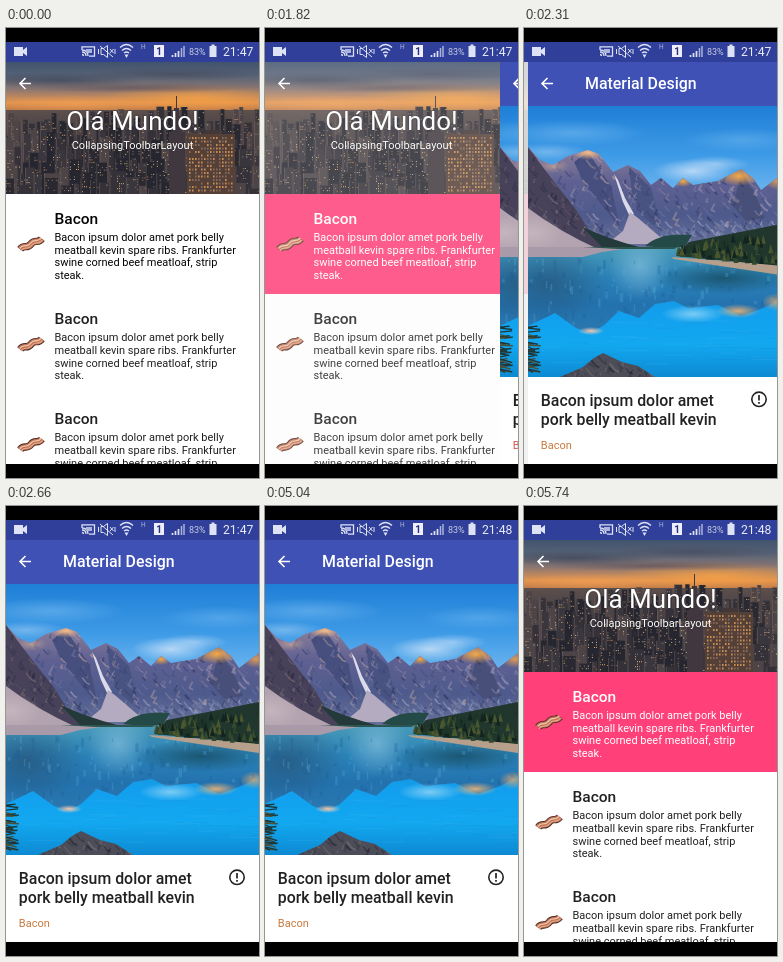
Animation of 253x450 px, one loop 5810 ms. Source, as an HTML page with a canvas:

```html
<!DOCTYPE html>
<html lang="pt">
<head>
<meta charset="utf-8">
<style>
html, body { margin: 0; width: 100%; height: 100%; overflow: hidden; background: #000; }
canvas { display: block; width: 100vw; height: 100vh; }
</style>
</head>
<body>
<canvas></canvas>
<script>
const W = 253, H = 450, LOOP = 5810, STEP = 70;
const TOP = 34, BOTTOM = 436;
const INK = '#212121', PINK = '#ff4079', INDIGO = '#3f51b5';
const canvas = document.querySelector('canvas');
const g = canvas.getContext('2d');

const clamp = v => Math.max(0, Math.min(1, v));
const span = (t, start, length) => clamp((t - start) / length);
const easeSine = p => (1 - Math.cos(Math.PI * p)) / 2;

// cubic-bezier(.4, 0, .2, 1), solved by bisection
function easeStandard(p) {
  let lo = 0, hi = 1;
  for (let i = 0; i < 20; i++) {
    const s = (lo + hi) / 2, r = 1 - s;
    if (1.2 * r * r * s + 0.6 * r * s * s + s * s * s < p) lo = s; else hi = s;
  }
  return lo * lo * (3 - 2 * lo);
}

function random(seed) {
  return () => (seed = (seed * 16807) % 2147483647) / 2147483647;
}

function box(x, y, w, h, fill) {
  g.fillStyle = fill;
  g.fillRect(x, y, w, h);
}

function text(value, x, y, size, fill, weight = 400, align = 'left') {
  g.font = `${weight} ${size}px Roboto, sans-serif`;
  g.textAlign = align;
  g.fillStyle = fill;
  g.fillText(value, x, y);
}

function shape(d, fill) {
  g.fillStyle = fill;
  g.fill(new Path2D(d));
}

function line(d, color, width = 1) {
  g.strokeStyle = color;
  g.lineWidth = width;
  g.stroke(new Path2D(d));
}

function gradient(y0, y1, ...colors) {
  const fade = g.createLinearGradient(0, y0, 0, y1);
  colors.forEach((c, i) => fade.addColorStop(i / (colors.length - 1), c));
  return fade;
}

// Elliptical glow, color given as "r,g,b"
function haze(x, y, rx, ry, rgb, alpha) {
  g.save();
  g.translate(x, y);
  g.scale(rx, ry);
  const glow = g.createRadialGradient(0, 0, 0, 0, 0, 1);
  glow.addColorStop(0, `rgba(${rgb},${alpha})`);
  glow.addColorStop(1, `rgba(${rgb},0)`);
  box(-1, -1, 2, 2, glow);
  g.restore();
}

function clipped(area, paint) {
  g.save();
  g.clip(area);
  paint();
  g.restore();
}

function rectPath(x, y, w, h) {
  const path = new Path2D();
  path.rect(x, y, w, h);
  return path;
}

function statusBar(clock) {
  const icon = '#dde2f5';
  box(0, 14, W, 20, '#303f99');
  shape('M8 19h9v3l4-3v9l-4-3v3h-9z', icon);
  line('M76 22v-3.2h12.5v9.4h-5.5M76 24q4 0 4 4M76 26.5q1.5 0 1.5 1.5M76 22q6 0 6 6', icon, 1.3);
  box(80, 21, 6, 4, '#aab4dc');
  line('M95 20.5v6h2.5l4 3v-12l-4 3zM94 18l13 11M104 21l3.5 4M107.5 21l-3.5 4M92.5 21v5M109 21v5', icon, 1);
  line('M114 19.5q6.5-6 13 0M116 22.5q4.5-4 9 0M118 25q2.5-2 5 0', icon, 1.4);
  shape('M118.5 26.5h4l-2 3.5z', icon);
  text('H', 135, 21, 6.5, '#aeb8e0');
  box(148, 17, 10, 12, '#eef');
  text('1', 153, 27, 10, '#263276', 700, 'center');
  line('M166.5 29v-2M169.5 29v-4M172.5 29v-6', icon, 1.7);
  line('M175.5 29v-9M178 29v-11', '#a8b2dc', 1.5);
  text('83%', 183, 27, 9, '#c9cfe6');
  box(203.5, 18, 7, 11, icon);
  box(205.5, 16.5, 3, 2, icon);
  text(clock, 217, 28, 12.2, '#e8ebf8');
}

function backArrow() {
  line('M25 55.5h-11M19.5 50l-5.5 5.5 5.5 5.5', '#fff', 1.6);
}

function skyline() {
  box(0, TOP, W, 132, gradient(34, 88, '#42536d', '#566276', '#8a7672', '#e2934f', '#a56b45'));
  haze(190, 70, 100, 14, '255,165,65', 0.7);
  haze(70, 76, 80, 9, '250,165,85', 0.5);
  haze(50, 52, 90, 8, '58,68,88', 0.7);
  haze(170, 46, 90, 7, '70,72,90', 0.6);
  haze(130, 60, 120, 5, '90,78,86', 0.6);
  box(0, 82, W, 84, gradient(82, 166, '#5d504d', '#38343b', '#24232a'));
  const rnd = random(47);
  const pick = list => list[Math.floor(rnd() * list.length)];
  const facades = ['#2a2931', '#3a363d', '#25262f', '#4c4446', '#343139'];
  const lights = ['#e9ab62', '#a97a58', '#8b7d78', '#d9bd96'];
  for (let layer = 0; layer < 6; layer++) {
    for (let x = -4; x < W;) {
      const w = 4 + rnd() * (4 + layer * 2);
      const y = 78 + layer * 13 + rnd() * 18;
      box(x, y, w, 166 - y, pick(facades));
      box(x, y, 1, 166 - y, 'rgba(150,125,115,.35)');
      for (let wy = y + 2; wy < 164; wy += 2.5) {
        for (let wx = x + 1.5; wx < x + w - 1; wx += 2) {
          if (rnd() < 0.22) box(wx, wy, 1, 1, pick(lights));
        }
      }
      x += w + rnd() * 3;
    }
  }
  shape('M163 166V104h3V88h2V80h2V68h1v12h2v8h2v16h4v62Z', '#40383e');
  box(181, 106, 48, 60, '#554038');
  for (let x = 183; x < 228; x += 3) {
    for (let y = 109; y < 165; y += 3.5) {
      if (rnd() < 0.7) box(x, y, 1.6, 2, pick(['#c98d52', '#86695a']));
    }
  }
  box(199, 102, 15, 4, '#443836');
}

function bacon(y) {
  g.save();
  g.translate(25, y);
  g.rotate(-0.45);
  const wave = dy => `M-12 ${dy}q3-1.6 6 0t6 0t6 0t6 0`;
  line(wave(0), '#4b2c22', 7.4);
  line(wave(0), '#c0705a', 5.6);
  line(wave(-1), '#edc5a2', 1.4);
  line(wave(1.6), '#e3ac88', 1.2);
  g.restore();
}

const bodyLines = [
  'Bacon ipsum dolor amet pork belly',
  'meatball kevin spare ribs. Frankfurter',
  'swine corned beef meatloaf, strip',
  'steak.'
];

function row(index, pressed) {
  const y = 166 + index * 100.2;
  if (pressed > 0) {
    clipped(rectPath(0, y, W, 100), () => {
      g.globalAlpha = 0.4 + 0.6 * pressed;
      g.fillStyle = PINK;
      g.beginPath();
      g.arc(34, 234, 20 + 220 * pressed, 0, 7);
      g.fill();
      g.globalAlpha = 1;
    });
  }
  const ink = pressed > 0.4 ? '#fff' : index ? INK : '#050505';
  bacon(y + 50);
  text('Bacon', 48.5, y + 30, 15.5, ink, 500);
  bodyLines.forEach((value, i) => text(value, 48.5, y + 47 + i * 12.7, 11, ink));
}

function listScreen(pressed) {
  box(0, TOP, W, BOTTOM - TOP, '#fff');
  clipped(rectPath(0, TOP, W, 132), skyline);
  backArrow();
  g.shadowColor = 'rgba(0,0,0,.35)';
  g.shadowBlur = 2;
  text('Olá Mundo!', 126.5, 102, 26, '#fff', 400, 'center');
  text('CollapsingToolbarLayout', 126.5, 121, 11, '#fff', 400, 'center');
  g.shadowBlur = 0;
  [pressed, 0, 0].forEach((p, i) => row(i, p));
}

const RIDGE = 'M0 119L12 132 25 137 40 128 60 122 71 126 85 144 100 137 112 143 123 157 133 150 145 160 155 150 165 157 190 153 213 141 225 150 233 162 253 147';
const MOUNTAINS = RIDGE + 'V222H0Z';

// Short ragged strokes that read as rock
function rockGrain(rnd, count, x, y, w, h, colors) {
  for (let i = 0; i < count; i++) {
    const size = 2 + rnd() * 5, lean = rnd() < 0.5 ? -0.5 : 0.8;
    g.globalAlpha = 0.25 + rnd() * 0.4;
    line(`M${x + rnd() * w} ${y + rnd() * h}l${size * lean} ${size}l${size * 0.6} ${size * 0.3}`,
      colors[i % colors.length], 0.8 + rnd() * 1.4);
  }
  g.globalAlpha = 1;
}

function mountains(rnd) {
  shape(MOUNTAINS, gradient(122, 220, '#8c7f99', '#5e6092', '#4e5a8c', '#66709a'));
  clipped(new Path2D(MOUNTAINS), () => {
    shape('M60 124L83 158 92 199 72 175 57 157 46 134Z', '#474f7f');
    shape('M101 139L123 160 134 204 113 187 104 164Z', '#495382');
    shape('M213 144L205 178 218 193 237 190 226 163Z', '#48507a');
    rockGrain(rnd, 330, 0, 124, W, 82, ['#2c345f', '#a39bb4', '#3e4878', '#7277a2', '#b39c9c']);
    rockGrain(rnd, 60, 130, 192, 123, 18, ['#b9bfd8', '#7683ae', '#566393']);
    haze(60, 125, 15, 7, '250,190,135', 1);
    haze(25, 138, 16, 7, '214,170,150', 0.6);
    haze(155, 153, 10, 6, '245,170,70', 1);
    haze(211, 148, 22, 10, '245,168,70', 1);
    haze(250, 153, 14, 9, '235,160,80', 0.9);
  });
  shape('M86 146L90 152 97 170 106 186 102 189 95 174Z', '#dcdbea');
  shape('M102 184L110 190 131 208 141 216H79L95 203Z', '#b5abc0');
  shape('M0 119L17 142 34 164 49 183 60 201 104 222H0Z', '#47425a');
  clipped(new Path2D('M0 119L17 142 34 164 49 183 60 201 90 220H0Z'), () =>
    rockGrain(rnd, 90, 0, 125, 65, 80, ['#242339', '#7d6c72', '#31304a']));
  shape('M0 180Q30 203 72 222L55 229H0Z', '#b3a3b0');
  haze(5, 205, 30, 18, '208,192,196', 0.6);
  shape('M54 199Q81 211 111 219L76 221Z', '#243a3a');
  shape('M117 218Q132 204 164 207L155 222Z', '#244a48');
}

function water(rnd) {
  box(0, 219, W, 130, gradient(219, 349, '#3a93bd', '#1a8fd6', '#129fee', '#12a8f0', '#0d8ad2'));
  const reflection = 'M0 219H253V270L238 279 213 288 190 277 160 280 146 273 127 276 111 290 91 283 75 298 62 305 48 300 27 285 0 298Z';
  shape(reflection, gradient(222, 305, '#4698b8', '#2a82b8', '#2372ae', '#2b78b0'));
  clipped(new Path2D(reflection), () => {
    haze(20, 255, 62, 40, '38,80,115', 0.7);
    haze(112, 238, 32, 34, '130,190,220', 0.7);
    haze(195, 250, 70, 16, '22,72,92', 0.75);
    for (let i = 0; i < 150; i++) {
      g.globalAlpha = 0.3;
      box(rnd() * W, 230 + rnd() * 72, 1 + rnd() * 3, 2 + rnd() * 7, i % 2 ? '#55a8d8' : '#1c5a96');
    }
    g.globalAlpha = 1;
  });
  haze(63, 303, 13, 4, '240,205,180', 1);
  haze(210, 283, 22, 7, '235,180,120', 0.9);
  haze(248, 274, 14, 9, '220,165,110', 0.8);
  haze(165, 286, 32, 9, '150,215,245', 0.8);
  for (let i = 0; i < 45; i++) {
    g.globalAlpha = 0.15;
    box(rnd() * W, 290 + rnd() * 50, 8 + rnd() * 25, 0.8, i % 2 ? '#63c8f4' : '#1b70ad');
  }
  g.globalAlpha = 1;
  shape('M0 219H110L74 224 55 229H0Z', '#a89aa8');
  shape('M54 219H150L146 221H90Z', '#2c5550');
}

function forest(rnd) {
  shape('M143 229L253 237V247L146 231Z', '#b6a08b');
  shape('M148 228L161 214 253 196V238Z', '#21372d');
  for (let i = 0; i < 110; i++) {
    const x = 150 + rnd() * 105, low = 226 + (x - 148) * 0.1;
    const high = 216 - (x - 151) * 0.2, tip = high + rnd() * (low - high - 6);
    shape(`M${x} ${tip}l2.5 9h-5Z`, ['#132420', '#33492f', '#1d3528', '#49572f'][i % 4]);
  }
}

function foreground(rnd) {
  const rocks = 'M32 349L55 339 66 330 75 325 94 334 110 338 127 349Z';
  shape(rocks, '#4c4d58');
  clipped(new Path2D(rocks), () =>
    rockGrain(rnd, 60, 34, 326, 90, 22, ['#23252f', '#8f8480', '#343742']));
  for (let i = 0; i < 34; i++) {
    const y = 299 + rnd() * 44;
    line(`M0 ${y}l${4 + rnd() * 9} ${rnd() * 6 - 2}`, i % 3 ? '#1e3638' : '#4a5138', 1.4);
  }
}

function lake() {
  const rnd = random(91);
  box(0, 78, W, 150, gradient(78, 175, '#1f7fd6', '#3d9ae6', '#79bcf0'));
  haze(165, 143, 40, 12, '215,232,250', 0.75);
  haze(188, 136, 34, 8, '190,220,248', 0.6);
  haze(45, 105, 75, 13, '120,188,240', 0.55);
  haze(215, 112, 60, 12, '110,182,238', 0.5);
  haze(20, 124, 40, 9, '170,210,242', 0.5);
  mountains(rnd);
  water(rnd);
  forest(rnd);
  foreground(rnd);
}

function detailScreen(x) {
  g.save();
  g.translate(x, 0);
  box(0, 33, W, 45, INDIGO);
  backArrow();
  text('Material Design', 57, 61, 15.9, '#fff', 500);
  clipped(rectPath(0, 78, W, 271), lake);
  box(0, 349, W, 87, '#fff');
  text('Bacon ipsum dolor amet', 12.8, 378.3, 15.85, INK, 500);
  text('pork belly meatball kevin', 12.8, 397, 15.85, INK, 500);
  text('Bacon', 12.8, 420.5, 11, x > 10 ? '#d4574f' : '#c9783d');
  g.beginPath();
  g.arc(231, 371.3, 7.2, 0, 7);
  g.strokeStyle = INK;
  g.lineWidth = 1.6;
  g.stroke();
  line('M231 367v5.5M231 374v1.7', INK, 1.7);
  g.restore();
}

function draw(t) {
  const enter = span(t, 1708, 718);
  const leave = span(t, 5126, 614);
  const x = Math.round(W * (1 - easeStandard(enter) + easeSine(leave)));
  g.globalAlpha = 1;
  box(0, 0, W, H, '#000');
  clipped(rectPath(0, 14, W, BOTTOM - 14), () => {
    if (x > 0) {
      listScreen(t < 1540 ? 0 : span(t, 1470, 238));
      g.globalAlpha = enter - leave;
      box(0, TOP, W, BOTTOM - TOP, '#f0f0f0');
      g.globalAlpha = 1;
    }
    if (x < W) detailScreen(x);
    statusBar(t < 3430 ? '21:47' : '21:48');
  });
  if (t >= 1400 && t < 1540) {
    g.beginPath();
    g.arc(34, 234, 9, 0, 7);
    g.fillStyle = 'rgba(245,245,245,.85)';
    g.fill();
    g.strokeStyle = '#c4c4c4';
    g.lineWidth = 1.3;
    g.stroke();
  }
}

let shown = -1;

function resize() {
  const ratio = window.devicePixelRatio || 1;
  canvas.width = Math.round(innerWidth * ratio);
  canvas.height = Math.round(innerHeight * ratio);
  g.setTransform(canvas.width / W, 0, 0, canvas.height / H, 0, 0);
  shown = -1;
}

const start = performance.now();

function tick() {
  const elapsed = (performance.now() - start) % LOOP;
  const t = Math.floor(elapsed / STEP) * STEP;
  if (t !== shown) draw(shown = t);
  requestAnimationFrame(tick);
}

addEventListener('resize', resize);
resize();
tick();
</script>
</body>
</html>
```
